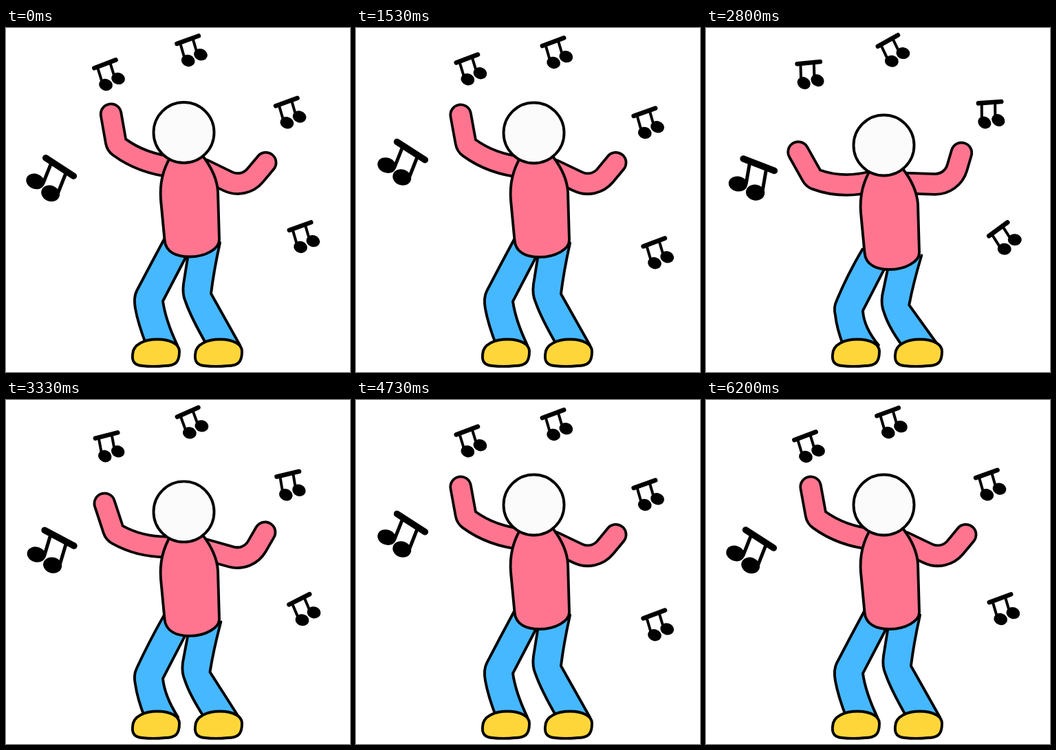
Recreate the animation shown at these times as an HTML page with a canvas. Size 500 by 500 pixels, loop 6230 ms.

```html
<!DOCTYPE html>
<html lang="en">
<head>
<meta charset="utf-8">
<title>Dancer</title>
<style>
  html, body { margin: 0; width: 100%; height: 100%; overflow: hidden; background: #fff; }
  canvas { display: block; width: 500px; height: 500px; }
</style>
</head>
<body>
<canvas id="stage" width="500" height="500"></canvas>
<script>
const ctx = document.getElementById('stage').getContext('2d');
const LOOP = 6230, TICKS = 187;   // 30 ticks per second
const SWAY = 39;                  // poses in one arm swing, at 25 poses per second
const LINE = 3.9;
const PINK = '#ff758f', BLUE = '#46b8ff', YELLOW = '#ffd63a', WHITE = '#fbfbfb';

const mix = (a, b, k) => a + (b - a) * k;
const mixPoint = (p, q, k) => [mix(p[0], q[0], k), mix(p[1], q[1], k)];
const wave = (n, period) => (1 - Math.cos(2 * Math.PI * n / period)) / 2;
const rad = deg => deg * Math.PI / 180;
const reach = ([x, y], deg, len) => [x + len * Math.cos(rad(deg)), y + len * Math.sin(rad(deg))];

// Each note drifts from one point to another while it rocks between two angles.
const notes = [
  { from: [148.8, 65],    to: [166.2, 57.2], tilt: [-21, 22] },
  { from: [268.8, 30],    to: [291.2, 33],   tilt: [-20, -46] },
  { from: [412.4, 120.3], to: [424, 135],    tilt: [-20, 24] },
  { from: [432.2, 301],   to: [438, 324.3],  tilt: [-20, -65] },
  { from: [73, 208.3],    to: [75, 184.8],   tilt: [33, 0], big: true }
];

function paint(path, fill) {
  ctx.fillStyle = fill;
  ctx.fill(path);
  ctx.lineWidth = LINE;
  ctx.strokeStyle = '#000';
  ctx.stroke(path);
}

function line(x1, y1, x2, y2, width) {
  ctx.lineWidth = width;
  ctx.beginPath();
  ctx.moveTo(x1, y1);
  ctx.lineTo(x2, y2);
  ctx.stroke();
}

function blob(x, y, rx, ry, deg) {
  ctx.beginPath();
  ctx.ellipse(x, y, rx, ry, rad(deg), 0, 2 * Math.PI);
  ctx.fill();
}

function smallNote() {
  line(-16.7, -13.6, 16.7, -13.6, 6.6);
  line(-12, -12, -13.5, 11, 4);
  line(7.5, -12, 6, 11, 4);
  blob(-9.8, 15, 10, 8.5, 38);
  blob(10.3, 13, 10, 8.5, 38);
}

function bigNote() {
  line(-23.5, -8, 25, -8, 9.5);
  line(-13, -8, -6.5, 25, 5);
  line(12.7, -8, 19.5, 26, 5);
  blob(-17.5, 28.8, 13.7, 11, -12);
  blob(10.5, 31.5, 13.7, 11.5, -12);
}

function drawNote(note, drift, rock) {
  ctx.save();
  ctx.translate(...mixPoint(note.from, note.to, drift));
  ctx.rotate(rad(mix(...note.tilt, rock)));
  ctx.fillStyle = ctx.strokeStyle = '#000';
  note.big ? bigNote() : smallNote();
  ctx.restore();
}

function limb(path) {
  ctx.strokeStyle = '#000';
  ctx.lineWidth = 33.6;
  ctx.stroke(path);
  ctx.strokeStyle = PINK;
  ctx.lineWidth = 26;
  ctx.stroke(path);
}

function leftArm(k) {
  const shoulder = [243, mix(202, 208, k)];
  const upper = mix(201.2, 149.7, k);
  const length = mix(88.5, 85.3, k);
  const elbow = reach(shoulder, upper, length);
  const hand = reach(elbow, mix(260, 206.5, k), mix(45.5, 41.6, k));
  const middle = reach(shoulder, upper, length / 2);
  const sag = reach(middle, upper - 90, mix(12, 17, k));
  const path = new Path2D();
  path.moveTo(...hand);
  path.arcTo(...elbow, ...sag, 12);
  path.quadraticCurveTo(...sag, ...shoulder);
  limb(path);
}

function rightArm(k) {
  const shoulder = [288, mix(206, 209, k)];
  const elbow = reach(shoulder, mix(26, -41, k), mix(64, 80, k));
  const hand = reach(elbow, mix(-50, -115.4, k), mix(50, 45, k));
  const path = new Path2D();
  path.moveTo(...hand);
  path.arcTo(...elbow, ...shoulder, 33);
  path.lineTo(...shoulder);
  limb(path);
}

function legs(k, dip) {
  const knee = 15 * k, knee2 = 18 * k;
  const left = new Path2D();
  left.moveTo(232 - 5 * k, 303 + dip);
  left.quadraticCurveTo(211 - 6 * k, 342 + knee2, 190, 382 + knee);
  left.quadraticCurveTo(185, 392 + knee, 188, 408 + knee * 0.7);
  left.quadraticCurveTo(192 - 2 * k, 430 + knee * 0.5, 204 - 5 * k, 461);
  left.lineTo(249 + 2 * k, 461);
  left.quadraticCurveTo(232 - 3 * k, 425 + knee * 0.7, 228, 397 + knee);
  left.lineTo(264 - 3 * k, 328 + dip);
  paint(left, BLUE);

  const right = new Path2D();
  right.moveTo(265, 328 + dip);
  right.lineTo(258 - 2 * k, 372 + knee2);
  right.quadraticCurveTo(256 - 2 * k, 387 + knee2, 261 - 2 * k, 398 + knee2);
  right.quadraticCurveTo(269 - 4 * k, 421 + knee2 * 0.8, 292 - 8 * k, 461);
  right.lineTo(340 - 3 * k, 461);
  right.lineTo(298 - 3 * k, 386 + knee2);
  right.quadraticCurveTo(302 - k, 353 + dip, 311 + 2.5 * k, 312 + dip);
  paint(right, BLUE);
}

const shoe = new Path2D(
  'M184 475 C184 459 203 452.500 220 452.500 C240 452.500 252 460 252 470 ' +
  'C252 486 246 491 231 491 C221 492 207 492 198 491 C187 490 183 485 184 475 Z');
const torso = new Path2D(
  'M240 186 C228 205 223 225 225 250 L230.500 308 C232 326 248 332.500 267 332.500 ' +
  'C290 332.500 310 321 310 308 L308 238 C307 220 299 203 286 186 Z');
const head = new Path2D();
head.arc(258.5, 152, 44, 0, 2 * Math.PI);

function drawShoe(x) {
  ctx.save();
  ctx.translate(x, 0);
  paint(shoe, YELLOW);
  ctx.restore();
}

function draw(n) {
  const drift = wave(n, SWAY * 2);
  const swing = wave(n, SWAY);
  const bob = wave(n, SWAY / 2);
  const dip = 20 * bob;

  ctx.fillStyle = '#fff';
  ctx.fillRect(0, 0, 500, 500);
  ctx.lineJoin = 'round';
  ctx.lineCap = 'round';
  for (const note of notes) drawNote(note, drift, swing);

  legs(bob, dip);
  drawShoe(0);
  drawShoe(91);

  ctx.save();
  ctx.translate(0, dip);
  leftArm(swing);
  rightArm(swing);
  paint(torso, PINK);
  paint(head, WHITE);
  ctx.restore();
}

const start = performance.now();
function tick() {
  const t = Math.max(0, performance.now() - start) % LOOP;
  const step = Math.floor(t * TICKS / LOOP + 0.16) % TICKS;
  draw(Math.floor(step * 5 / 6));
  requestAnimationFrame(tick);
}
tick();
</script>
</body>
</html>
```
